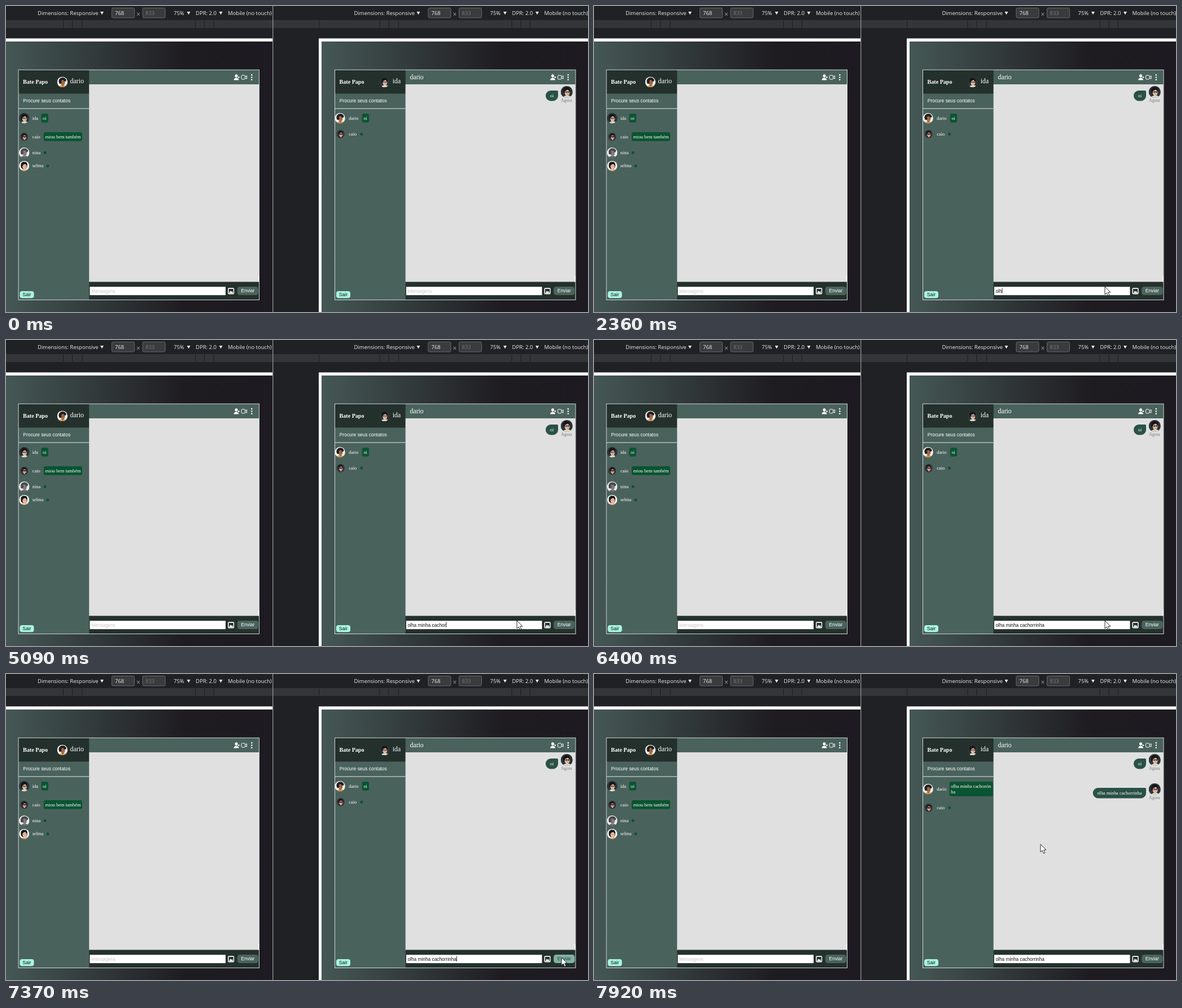
Write an HTML page with a canvas that moves like this. It is 1031 px wide and 543 px high and loops after 7990 ms.

```html
<!DOCTYPE html>
<html lang="pt">
<head>
<meta charset="utf-8">
<title>Bate Papo</title>
<style>
  html, body { margin: 0; width: 100%; height: 100%; overflow: hidden; background: #202124; }
  canvas { display: block; }
</style>
</head>
<body>
<canvas id="stage" width="1031" height="543"></canvas>
<script>
const ctx = document.getElementById('stage').getContext('2d');
const LOOP = 7990;
const SHIFT = 560.5;
const SANS = '"Liberation Sans", Arial, sans-serif';
const SERIF = '"Liberation Serif", "Times New Roman", serif';
const TOOLS = '"Open Sans", "Noto Sans", sans-serif';
const TEAL = '#4a625c', DARK = '#24302c', GREEN = '#0a5432';

const MESSAGE = 'olha minha cachorrinha';
const KEYS = [1810, 2010, 2360, 2490, 2620, 2820, 3020, 3280, 3480, 3550, 3750,
  3880, 4080, 4480, 4610, 4960, 5090, 5220, 5350, 5610, 5810, 5940];
const CARET_ON = [[1350, 6400], [6930, 7440]];
const HOVER = [7090, 7710];
const SENT = 7440, LISTED = 7780;

// time, x, y of the pointer tip
const POINTER = [[260, 462, 530], [480, 600, 526], [760, 880, 505], [890, 928, 492],
  [1020, 905, 498], [6600, 905, 498], [6800, 942, 483], [7020, 982, 493], [7200, 988, 502],
  [7370, 984, 503], [7520, 984, 503], [7650, 976, 485], [7780, 905, 405], [7920, 791, 302]];

const within = (t, [from, to]) => t >= from && t < to;

function rect(x, y, w, h, fill) {
  ctx.fillStyle = fill;
  ctx.fillRect(x, y, w, h);
}

function round(x, y, w, h, r, fill, stroke) {
  ctx.beginPath();
  ctx.roundRect(x, y, w, h, r);
  ctx.fillStyle = fill;
  ctx.fill();
  if (stroke) {
    ctx.strokeStyle = stroke;
    ctx.lineWidth = 1;
    ctx.stroke();
  }
}

function oval(x, y, rx, ry, fill) {
  ctx.beginPath();
  ctx.ellipse(x, y, rx, ry, 0, 0, 7);
  ctx.fillStyle = fill;
  ctx.fill();
}

function poly(points, fill) {
  ctx.beginPath();
  points.forEach(([x, y]) => ctx.lineTo(x, y));
  ctx.closePath();
  ctx.fillStyle = fill;
  ctx.fill();
}

function text(str, x, y, size, family, fill = '#fff', align = 'left', weight = '') {
  ctx.font = `${weight} ${size}px ${family}`;
  ctx.textAlign = align;
  ctx.fillStyle = fill;
  ctx.fillText(str, x, y);
}

function at(x, y, draw) {
  ctx.save();
  ctx.translate(x, y);
  draw();
  ctx.restore();
}

const LOOKS = {
  dario: { bg: '#f1f0ee', skin: '#a46d48', hair: '#221d20', top: '#d29a4e', curly: true },
  ida: { bg: '#2b3438', skin: '#f1c5a8', hair: '#15161a', top: '#cfe0d8', glasses: true },
  caio: { bg: '#31393b', skin: '#efa294', hair: '#1b1b1f', top: '#1d2d30', shades: true },
  nina: { bg: '#ecebeb', skin: '#858383', hair: '#4a4a4b', top: '#585b5c', curly: true },
  selma: { bg: '#f6f5f3', skin: '#f3c1a1', hair: '#17171a', top: '#e8a998', bob: true }
};

function avatar(who, x, y, r) {
  const look = LOOKS[who];
  at(x, y, () => {
    ctx.scale(r, r);
    ctx.beginPath();
    ctx.arc(0, 0, 1, 0, 7);
    ctx.clip();
    rect(-1, -1, 2, 2, look.bg);
    if (look.bob) round(-.65, -.75, 1.25, 1.35, .5, look.hair);
    oval(.1, 1.05, .75, .45, look.top);
    rect(-.1, .3, .35, .5, look.skin);
    oval(.08, .08, .43, .55, look.skin);
    if (look.curly) {
      for (let i = 0; i < 7; i++) {
        const a = 2.7 + i * .52;
        oval(.05 + Math.cos(a) * .5, -.12 + Math.sin(a) * .5, .25, .25, look.hair);
      }
    } else {
      poly([[-.55, .2], [-.62, -.45], [-.2, -.82], [.4, -.75], [.62, -.3],
        [.5, -.05], [.2, -.38], [-.25, -.2], [-.35, .15]], look.hair);
    }
    if (look.shades) round(-.3, -.1, .8, .25, .1, '#141418');
    else {
      oval(-.05, .02, .06, .06, '#241c1c');
      oval(.3, .02, .06, .06, '#241c1c');
    }
    if (look.glasses) {
      ctx.strokeStyle = '#38302e';
      ctx.lineWidth = .07;
      ctx.strokeRect(-.2, -.1, .26, .23);
      ctx.strokeRect(.18, -.1, .26, .23);
    }
    rect(.02, .36, .24, .07, '#a4514a');
  });
}

function caretDown(x) {
  poly([[x, 10], [x + 6, 10], [x + 3, 15.5]], '#e4e5e7');
}

function toolbar() {
  const label = (s, x) => text(s, x, 16.3, 9.5, TOOLS, '#eceded');
  label('Dimensions: Responsive', 56);
  caretDown(167);
  round(187.5, 3.5, 40, 17.5, 2, '#3a3b3d', '#66686b');
  label('768', 193);
  text('×', 231, 18.5, 12, TOOLS, '#9a9b9e');
  round(242, 3.5, 40, 17.5, 2, '#3a3b3d', '#66686b');
  text('833', 247, 16.3, 9.5, TOOLS, '#76787b');
  label('75%', 297);
  caretDown(320.5);
  label('DPR: 2.0', 336);
  caretDown(377.5);
  label('Mobile (no touch)', 393);
  rect(-90, 25, 600, 14, '#343539');
  for (const x of [-6.5, 101, 117, 134.5, 335, 351, 367.5]) rect(x, 26, 1, 12, '#1c1d20');
}

function headerIcons() {
  oval(408, 124, 2.5, 2.7, '#fff');
  ctx.beginPath();
  ctx.ellipse(408, 131.5, 4.5, 4, 0, Math.PI, 0);
  ctx.fill();
  rect(410.5, 126, 3.5, 1, '#fff');
  rect(411.8, 124.7, 1, 3.5, '#fff');
  ctx.strokeStyle = '#fff';
  ctx.lineWidth = 1;
  ctx.beginPath();
  ctx.roundRect(417, 123, 6.5, 7, 1.5);
  ctx.moveTo(423.5, 125.5);
  ctx.lineTo(426.5, 123.8);
  ctx.lineTo(426.5, 129.2);
  ctx.lineTo(423.5, 127.5);
  ctx.stroke();
  for (const y of [122.2, 126.5, 130.8]) oval(435.3, y, 1.3, 1.3, '#fff');
}

function frame(user, avatarX, nameX) {
  rect(22, 113, 426.5, 408.5, TEAL);
  rect(22, 113, 125.2, 42.5, DARK);
  text('Bate Papo', 30, 138, 10.1, SERIF, '#fff', 'left', 'bold');
  avatar(user, avatarX, 134.8, 9.3);
  text(user, nameX, 137.3, 11.8, SERIF);
  text('Procure seus contatos', 30.3, 171.3, 8.43, SANS);
  rect(22, 181.5, 125, 1, '#e6ebe9');
  rect(147.2, 139, 301, 351, '#e0e0e0');
  rect(147.2, 489.5, 301, 31.5, DARK);
  rect(446.8, 479, 1.4, 10.5, '#fff');
  round(24.5, 506, 25, 12.2, 4, '#a9f6e2');
  text('Sair', 37, 515, 8.6, SANS, '#101514', 'center');
  headerIcons();
  rect(148.5, 498.3, 240.5, 14.8, '#fff');
  round(393, 500.3, 11.2, 11.2, 2, '#fff');
  rect(394.5, 502, 8.2, 7.8, DARK);
  poly([[395, 509.5], [397.6, 505.3], [399.2, 507.2], [400.5, 506], [402.5, 509.5]], '#fff');
  ctx.strokeStyle = '#cfd6d4';
  ctx.lineWidth = 1;
  ctx.strokeRect(22, 113.3, 426.5, 408.2);
}

function sendButton(hover) {
  round(409.7, 498, 37.3, 15, 4.5, hover ? '#82b0a3' : '#4a635d');
  text('Enviar', 428.3, 508.3, 8.5, SANS, hover ? '#24403a' : '#fff', 'center');
}

function contact(who, y, r, x = 32.2) {
  avatar(who, x, y, r);
  text(who, 46.8, y + 2.5, 8.35, SERIF);
}

function bubble(x, y, w, lines) {
  round(x, y, w, 5.5 + lines.length * 10.2, 3, GREEN);
  lines.forEach((s, i) => text(s, x + 2.6, y + 10.5 + i * 10.2, 8.35, SERIF));
}

const dot = (x, y) => oval(x, y, 2.5, 2.5, GREEN);

function sentMessage(str, y, left) {
  const right = 417.5;
  round(left, y, right - left, 18.5, [9.2, 2, 9.2, 9.2], '#2a5145');
  text(str, (left + right) / 2, y + 11.8, 8.37, SERIF, '#fff', 'center');
  avatar('ida', 432.8, y + 2.5, 10.6);
  text('Agora', 432.3, y + 19.6, 7.8, SERIF, '#777', 'center');
}

function page(clipX, clipW, shift, draw) {
  ctx.save();
  ctx.beginPath();
  ctx.rect(clipX, 0, clipW, 543);
  ctx.clip();
  ctx.translate(shift, 0);
  toolbar();
  rect(-6.5, 57.5, 500, 486, '#fff');
  const shade = ctx.createLinearGradient(-1.5, 0, 473, 0);
  shade.addColorStop(0, '#455855');
  shade.addColorStop(.68, '#1e1b21');
  shade.addColorStop(1, '#1d1b21');
  rect(-1.5, 63, 500, 480, shade);
  draw();
  ctx.restore();
}

function leftPage() {
  frame('dario', 99.8, 113.6);
  contact('ida', 199, 9.3);
  bubble(62.5, 191, 12.3, ['oi']);
  contact('caio', 232, 7.2);
  bubble(66.8, 224, 68.2, ['estou bem também']);
  contact('nina', 260.3, 9.3);
  dot(69, 260.3);
  contact('selma', 283.7, 9);
  dot(74, 283.7);
  text('Mensagens', 151, 508.6, 8.32, SANS, '#c9c9c9');
  sendButton(false);
}

function rightPage(t) {
  frame('ida', 110, 124.3);
  text('dario', 155, 130, 11.8, SERIF);
  const listed = t >= LISTED;
  contact('dario', listed ? 204 : 199, 9.2, 31.2);
  if (listed) bubble(69.2, 191, 77, ['olha minha cachorrin', 'ha']);
  else bubble(70.3, 191, 12.3, ['oi']);
  const y = listed ? 237.3 : 227.2;
  contact('caio', y, 7.2);
  dot(69.2, y);

  sentMessage('oi', 150, 395.5);
  if (t >= SENT) sentMessage(MESSAGE, 202, 323.3);

  const typed = MESSAGE.slice(0, KEYS.filter(k => t >= k).length);
  text(typed || 'Mensagens', 151, 508.6, 8.32, SANS, typed ? '#111' : '#c9c9c9');
  if (CARET_ON.some(span => within(t, span))) {
    rect(151 + (typed ? ctx.measureText(typed).width : 0), 500.5, .9, 9.5, '#111');
  }
  sendButton(within(t, HOVER));
}

function pointer(t) {
  if (t < POINTER[0][0]) return;
  let i = POINTER.findLastIndex(p => t >= p[0]);
  const [t0, x0, y0] = POINTER[i];
  const [t1, x1, y1] = POINTER[i + 1] || [LOOP, x0, y0];
  const k = (t - t0) / (t1 - t0);
  at(x0 + (x1 - x0) * k, y0 + (y1 - y0) * k, () => {
    poly([[0, 0], [0, 14], [3.2, 11], [5.6, 16.3], [8, 15.2], [5.7, 10.2], [10, 10]], '#fff');
    ctx.strokeStyle = '#15171a';
    ctx.lineWidth = .9;
    ctx.stroke();
  });
}

function draw(t) {
  rect(0, 0, 1031, 543, '#202124');
  page(0, 472, 0, leftPage);
  page(473, 558, SHIFT, () => rightPage(t));
  rect(472, 0, 1.4, 543, '#8b8c8e');
  pointer(t);
}

const start = performance.now();
function tick() {
  draw((performance.now() - start) % LOOP);
  requestAnimationFrame(tick);
}
tick();
</script>
</body>
</html>
```
